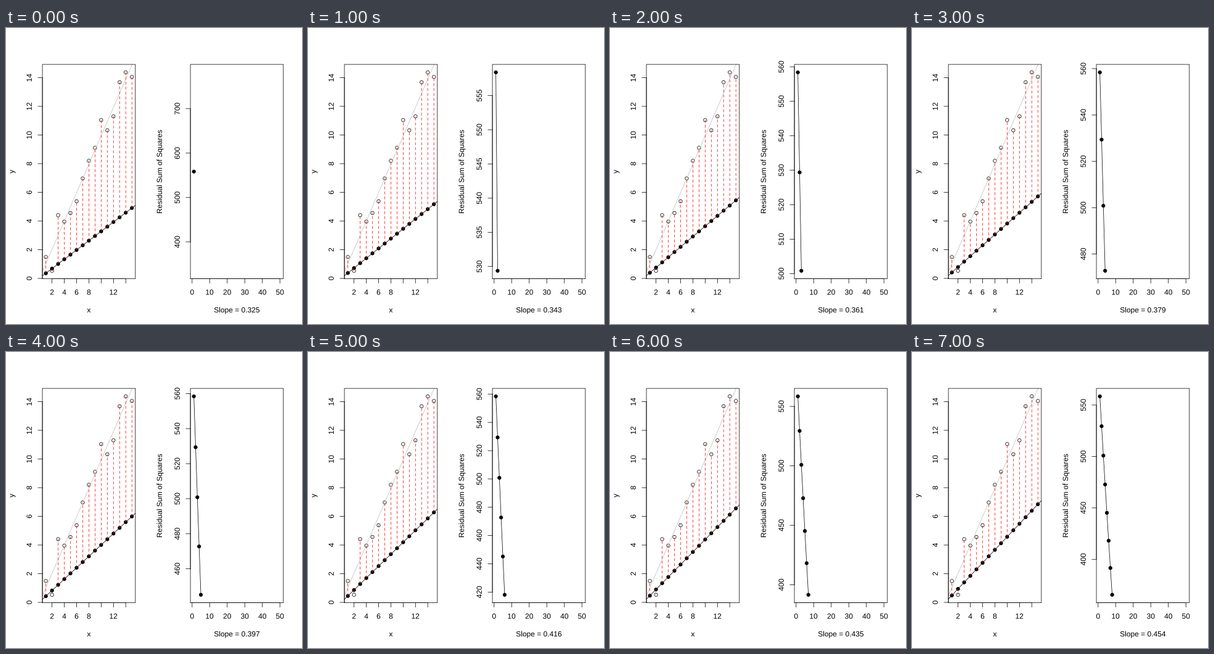
A matplotlib script that plays this animation: 480 by 480 pixels, repeating every 8 s.

```python
import math

import matplotlib.pyplot as plt
import numpy as np
from matplotlib.animation import FuncAnimation
from matplotlib.patches import Circle, PathPatch
from matplotlib.textpath import TextPath
from matplotlib.transforms import Affine2D

SIZE = 480
FRAMES = 8
STEPS = 50
LINE = 14.4                      # height of one margin line
TOP, BOTTOM = 4.1 * LINE, SIZE - 5.1 * LINE
WIDTH = 0.75

plt.rcParams.update({
    "font.family": "Liberation Sans",
    "lines.scale_dashes": False,
    "path.snap": False,
})

# Data, least-squares fit and the sweep of slopes at equal angles
x = np.arange(1, 16)
y = np.array([1.49, 0.53, 4.41, 3.96, 4.56, 5.38, 6.97, 8.20,
              9.11, 11.04, 10.33, 11.30, 13.68, 14.37, 14.05])
best, intercept = np.polyfit(x, y, 1)
slopes = np.tan(np.radians(np.linspace(18, 63, STEPS)))
rss = np.array([np.sum((y - intercept - s * x) ** 2) for s in slopes])

fig = plt.figure(figsize=(SIZE / 72, SIZE / 72), dpi=72, facecolor="white")
ax = fig.add_axes([0, 0, 1, 1])


def padded(lo, hi):
    if lo == hi:
        lo, hi = lo * 0.6, hi * 1.4
    pad = 0.04 * (hi - lo)
    return lo - pad, hi + pad


def pretty(lo, hi):
    """Round tick values, about five intervals."""
    cell = (hi - lo) / 5
    base = 10 ** math.floor(math.log10(cell))
    unit = base
    for factor, bias in ((2, 0.8), (5, 1.7), (10, 0.8)):
        if factor * base - cell < bias * (cell - unit):
            unit = factor * base
        else:
            break
    return np.arange(math.ceil(lo / unit), math.floor(hi / unit) + 1) * unit


def stroke(xs, ys, color="black", **kw):
    ax.plot(xs, ys, color=color, lw=WIDTH, **kw)


def label(px, py, text, angle=0):
    """Text centred on px, py at its baseline, placed to a part of a pixel."""
    path = TextPath((0, 0), text, size=12)
    box = path.get_extents()
    place = (Affine2D().translate(-(box.x0 + box.x1) / 2, 0).scale(1, -1)
             .rotate_deg(-angle).translate(px, py))
    ax.add_patch(PathPatch(place.transform_path(path), fc="black", lw=0))


class Panel:
    def __init__(self, left, xlim, ylim):
        self.left, self.right = left, left + 150.72
        self.xlim, self.ylim = padded(*xlim), padded(*ylim)

    def px(self, v):
        lo, hi = self.xlim
        return self.left + (v - lo) / (hi - lo) * (self.right - self.left)

    def py(self, v):
        lo, hi = self.ylim
        return BOTTOM - (v - lo) / (hi - lo) * (BOTTOM - TOP)

    def line(self, slope, color):
        end = min(self.xlim[1], (self.ylim[1] - intercept) / slope)
        xs = np.array([self.xlim[0], end])
        stroke(self.px(xs), self.py(intercept + slope * xs), color)

    def dots(self, xs, ys, filled):
        for center in zip(self.px(xs), self.py(ys)):
            ax.add_patch(Circle(center, 2.7, ec="black", lw=WIDTH, zorder=2,
                                fc="black" if filled else "none"))

    def frame(self, xticks, hidden, xlabel, ylabel):
        l, r = self.left, self.right
        stroke([l, r, r, l, l], [BOTTOM, BOTTOM, TOP, TOP, BOTTOM])
        yticks = pretty(*self.ylim)
        stroke(self.px(xticks[[0, -1]]), [BOTTOM] * 2)
        stroke([l, l], self.py(yticks[[0, -1]]))
        for v in xticks:
            p = self.px(v)
            stroke([p, p], [BOTTOM, BOTTOM + LINE / 2])
            if v not in hidden:
                label(p, BOTTOM + 1.8 * LINE, str(v))
        for v in yticks:
            p = self.py(v)
            stroke([l, l - LINE / 2], [p, p])
            label(l - 1.2 * LINE, p, f"{v:.0f}", 90)
        label((l + r) / 2, BOTTOM + 3.8 * LINE, xlabel)
        label(l - 3.2 * LINE, (TOP + BOTTOM) / 2, ylabel, 90)


def draw(i):
    ax.clear()
    ax.set_axis_off()
    ax.set_xlim(0, SIZE)
    ax.set_ylim(SIZE, 0)
    slope = slopes[i]
    fitted = intercept + slope * x

    data = Panel(4.1 * LINE, (1, 15), (y.min(), y.max()))
    data.dots(x, y, False)
    data.line(best, "#bebebe")
    data.dots(x, fitted, True)
    data.line(slope, "black")
    for xi, fi, yi in zip(x, fitted, y):
        stroke([data.px(xi)] * 2, [data.py(fi), data.py(yi)], "red",
               ls=(0, (4, 4)), dash_capstyle="round")
    data.frame(np.arange(2, 15, 2), (10, 14), "x", "y")

    shown = rss[:i + 1]
    count = np.arange(1, i + 2)
    error = Panel(SIZE / 2 + 4.1 * LINE, (1, STEPS), (shown.min(), shown.max()))
    stroke(error.px(count), error.py(shown))
    error.dots(count, shown, True)
    error.frame(np.arange(0, 51, 10), (), f"Slope = {slope:.3f}",
                "Residual Sum of Squares")
    return []


anim = FuncAnimation(fig, draw, frames=FRAMES, interval=1000,
                     init_func=lambda: [], repeat=True, repeat_delay=0)
plt.show()
```
